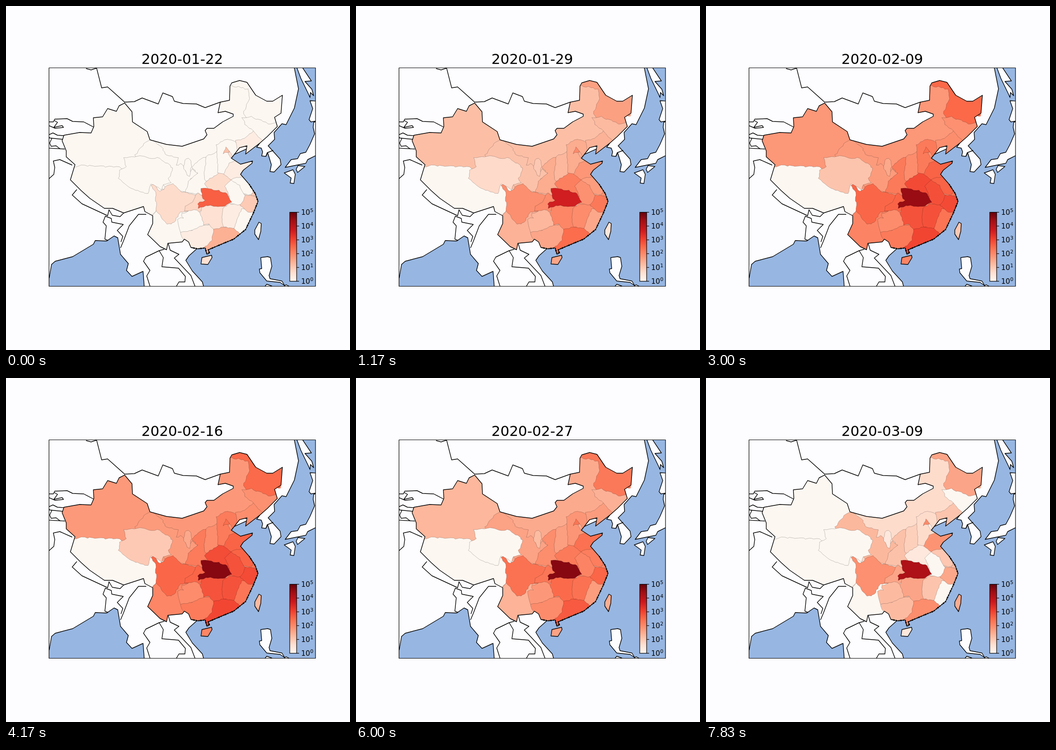
An HTML page that plays this animation: 748 px wide and 748 px high, repeating every 8000 ms.

```html
<!DOCTYPE html>
<html lang="en">
<head>
<meta charset="utf-8">
<title>Daily map</title>
<style>
html, body { margin: 0; width: 100%; height: 100%; overflow: hidden; background: #fdfdff; }
svg { display: block; width: 100%; height: 100%; }
text { font-family: "DejaVu Sans", sans-serif; fill: #000; }
.line { fill: none; stroke: #000; stroke-width: 1.4; stroke-linejoin: round; }
.sea { fill: #97b6e1; }
.land { fill: #fdfdff; }
.area { stroke: #000; stroke-opacity: .45; stroke-width: .5; }
.islets { stroke-width: 3; stroke-dasharray: 1.5 3 3 2 1 5; }
.thin { stroke-width: 1.2; }
</style>
</head>
<body>
<svg viewBox="0 0 748 748">
  <defs>
    <clipPath id="frame"><rect x="93.5" y="134.5" width="579.5" height="475"/></clipPath>
    <clipPath id="country"><path id="mask"/></clipPath>
    <linearGradient id="ramp" x1="0" y1="1" x2="0" y2="0"></linearGradient>
  </defs>
  <g clip-path="url(#frame)">
    <g id="base"></g>
    <g id="areas" clip-path="url(#country)"></g>
    <g id="edges"></g>
  </g>
  <rect class="line thin" x="93.5" y="134.5" width="579.5" height="475"/>
  <text id="title" x="383.3" y="125.6" font-size="30.56" text-anchor="middle"></text>
  <g id="bar"><rect class="thin" x="617" y="448.5" width="15" height="150" fill="url(#ramp)" stroke="#000"/></g>
</svg>
<script>
const $ = id => document.getElementById(id);
const LOOP = 8000, DAY_MS = 1000 / 6, LAST_DAY = 47, PEAK_DAY = 20;
const REDS = ['fdf7f1', 'fee0d2', 'fcbba1', 'fc9272', 'fb6a4a', 'ef3b2c', 'cb181d', 'a50f15', '67000d'];

function add(parent, tag, attrs, text) {
  const node = document.createElementNS('http://www.w3.org/2000/svg', tag);
  for (const key in attrs) node.setAttribute(key, attrs[key]);
  if (text) node.textContent = text;
  return parent.appendChild(node);
}
const open = pts => 'M' + pts;
const closed = pts => open(pts) + 'z';
const draw = (group, kind, d) => add($(group), 'path', { d, class: 'line ' + kind });
const sea = pts => draw('base', 'sea', closed(pts));
const land = pts => draw('base', 'land', closed(pts));
const border = pts => draw('base', '', open(pts));

// Seas, islands and neighbours
sea('85,595 94,591 99,562 107,555 145,545 190,518 194,510 219,511 235,500 243,504 249,540 266,560 262,575 274,588 298,577 301,615 85,615');
sea('431,615 427,600 405,576 391,553 398,543 417,526 480,480 480,330 552,298 545,307 555,309 558,317 556,326 565,327 569,319 577,345 574,360 583,361 598,345 596,333 570,304 584,290 583,275 600,256 609,258 627,222 636,180 626,130 680,130 680,615');
land('631,130 641,157 657,190 661,199 662,188 669,195 665,181 650,164 664,163 642,130');
land('680,207 661,206 667,223 659,247 663,252 680,249 669,253 668,264 671,278 661,301 652,318 640,321 634,332 620,334 607,351 652,342 656,334 680,322');
land('631,355 635,347 650,349 634,362');
land('605,363 624,356 629,366 626,386 618,385 620,374');
land('554,547 569,545 575,547 578,566 572,586 574,593 600,598 606,608 596,601 567,598 552,580 551,572 556,571');
land('561,612 567,605 578,609');
land('598,615 609,606 626,615');

border('174,136 185,139 197,135 208,178 221,176 258,209 279,208 296,200 331,213 341,189 362,197 366,207 385,212 414,213 433,221 466,209');
border('93,252 103,252 106,246 133,245 145,251 169,252 190,263');
border('93,260 107,266 125,264 122,260 104,264 112,253 105,249');
border('93,280 102,276 112,281 126,282');
border('93,284 95,287 124,290');
border('100,287 95,298 98,305 109,304 118,311');
border('90,309 128,311');
border('93,376 104,366 106,351 103,337 117,334 144,346');
border('154,399 144,411 165,430 221,456 224,443 231,455 248,458 256,450');
border('222,510 215,507 218,478 211,470 216,457 229,462 230,470 255,475 242,488 254,501 250,513');
border('305,453 288,453 268,478 255,512 249,526');
border('314,612 306,587 313,575 299,555 304,546 333,532 344,529');
border('333,532 342,547 339,567 375,570 390,588 389,600 376,600 369,612');
border('353,517 357,531 376,540 366,548 402,586 412,612');
border('565,327 568,319 581,314');

// Country outline, clockwise in stretches
const north = '126,281 160,275 185,276 191,262 190,243 210,241 221,223 240,229 246,217 258,211 274,230 275,252 307,273 313,291 349,301 383,305 430,289 437,280 433,271 437,266 452,266 471,252 494,240 494,235 477,229 461,232 466,209 486,205 487,174 491,167 508,162 524,166 543,194 567,207 580,207 601,194 598,233 584,242 590,262';
const gulf = '568,284 552,298 521,322 524,304 508,308 490,331 510,344 536,337 535,342 516,357 510,366';
const shore = '529,388 542,408 548,425 538,450 521,486 495,507 473,516 440,530 442,537 437,540 433,526 417,528 402,525';
const west = '397,513 388,507 383,513 352,516 349,530 335,523 308,497 319,473 319,456 302,447 299,436 256,450 232,440 214,440 182,418 163,401 140,378 150,345 131,328 131,315 122,293';
const islands = closed('426,547 447,542 448,547 439,562 424,561') + closed('550,470 555,473 554,490 549,508 541,496 541,487');
const nub = closed('590,230 598,230 597,240 591,240');
const outline = closed([north, gulf, shore, west].join(' ')) + islands;
$('mask').setAttribute('d', outline + nub);
draw('edges', '', outline);
draw('edges', 'islets', open(shore));

// Deterministic noise in -0.5..0.5
function noise(x, y) {
  const n = Math.sin(x * 12.9 + y * 78.2) * 43758.5;
  return n - Math.floor(n) - .5;
}

// Winding boundary: a slightly shifted point about every 6 px
function winding(pts) {
  const p = pts.split(' ').map(s => s.split(',').map(Number)), out = [];
  p.forEach(([x, y], i) => {
    const [u, v] = p[(i + 1) % p.length];
    const steps = Math.ceil(Math.hypot(u - x, v - y) / 6);
    for (let k = 0; k < steps; k++) {
      const a = x + (u - x) * k / steps, b = y + (v - y) * k / steps;
      out.push((a + 3 * noise(a, b)).toFixed(1) + ',' + (b + 3 * noise(b, a)).toFixed(1));
    }
  });
  return closed(out.join(' '));
}

// Levels are log10 of the count; later areas cover hidden sides of earlier ones
const regions = [];
function area(start, peak, end, pts, peakDay = PEAK_DAY) {
  const node = add($('areas'), 'path', { d: winding(pts), class: 'area' });
  regions.push({ node, start, peak, end, peakDay });
}
area(0, 1.8, .7, '90,130 640,130 640,580 90,580');
area(0, 1.8, 0, '80,180 320,180 316,291 330,350 280,390 80,390');
area(0, 0, 0, '80,353 148,351 165,347 246,350 345,400 326,448 305,462 80,470');
area(0, 1.75, 1.3, '281,325 300,299 316,291 324,294 341,309 345,321 375,331 371,346 383,343 398,368 405,355 416,362 416,372 402,376 390,406 350,395 290,340');
area(0, 1.55, .4, '386,348 389,335 397,330 403,338 402,361 398,372 389,358');
area(0, 1.1, -5, '257,330 292,325 317,332 330,329 357,346 363,357 354,374 358,385 343,389 339,399 315,388 308,408 272,397 245,376 248,357 261,350');
area(0, 2.1, -.6, '285,470 316,460 327,446 400,445 400,500 380,545 290,545');
area(0, 2.25, 1.15, '434,328 418,336 404,350 416,364 397,380 390,405 440,412 450,375 445,340');
area(.7, 2.55, 1.9, '314,389 323,388 334,403 345,400 348,391 362,386 383,404 416,411 410,445 378,449 369,466 359,474 349,473 327,446 325,405');
area(.8, 2.58, 1.6, '416,407 440,419 430,440 417,449 388,446 389,436 404,427');
area(0, 1.98, 1.25, '372,463 385,460 381,452 409,442 440,460 440,475 388,494 379,491');
area(.3, 2.25, 1.25, '378,491 400,489 430,476 460,474 465,510 445,545 395,545 385,507');
area(.6, 2.82, 1.6, '427,430 485,435 485,490 455,492 443,475 430,476 423,450');
area(1.41, 3, 1.95, '452,486 473,480 500,478 530,510 440,555 425,540 433,524 448,508');
area(.3, 2.84, 1.1, '472,440 484,430 515,428 520,445 497,484 473,480 470,470');
area(0, 2.35, 0, '540,440 513,442 503,460 497,484 518,505 555,480');
area(1, 2.93, 1.55, '505,408 541,414 560,418 560,450 526,448 509,433');
area(0, 2.6, 1.05, '490,366 500,372 515,355 570,390 531,411 505,405 485,380');
area(.95, 2.38, 1.25, '538,401 552,405 546,414 532,411');
area(0, 2.86, 0, '475,380 489,378 508,391 521,412 510,433 475,425 470,395');
area(.7, 2.93, .4, '450,362 473,360 490,378 476,391 486,415 445,410 432,387');
area(2.65, 4.7, 4.23, '425,397 435,397 462,402 482,408 490,426 472,437 440,433 419,439 417,430 432,422 426,413', 30);
area(0, 1.98, .9, '436,327 462,315 475,330 462,364 434,381 431,366');
area(0, 2.25, .7, '458,303 466,294 481,291 490,290 515,305 490,360 475,367 461,362 459,330');
area(.3, 2.6, 1.85, '485,342 520,325 550,325 550,360 490,377 474,367');
area(.6, 1.9, .3, '486,315 492,326 489,332 483,322');
area(1.15, 2.45, 2, '473,315 479,306 487,317 472,321');
area(0, 2.52, 1.6, '486,173 505,176 526,181 529,200 516,234 540,265 600,270 615,185 530,150 480,155');
area(0, 1.92, 0, '514,243 533,241 570,256 605,254 600,295 535,300 537,271 522,261');
area(.3, 1.95, 1.1, '499,293 519,288 537,271 556,292 570,320 505,335');
area(.6, 2.08, .4, '415,541 455,541 455,570 415,570');
area(0, 1.5, 1.5, '535,465 560,465 560,512 535,512', LAST_DAY);

// Colour bar
REDS.forEach((c, i) => add($('ramp'), 'stop', { offset: i / 8, 'stop-color': '#' + c }));
for (let i = 0; i < 6; i++) {
  const y = 598.5 - 30 * i;
  draw('bar', 'thin', `M632,${y}h5.3`);
  add($('bar'), 'text', { x: 641.8, y: y + 5.8, 'font-size': 15.28 }, '10');
  add($('bar'), 'text', { x: 661.6, y: y - .1, 'font-size': 10.7 }, String(i));
}

const channels = hex => [0, 2, 4].map(i => parseInt(hex.slice(i, i + 2), 16));
function color(level) {
  const x = level * 1.6, i = Math.min(7, Math.floor(x));
  const a = channels(REDS[i]), b = channels(REDS[i + 1]);
  return `rgb(${a.map((v, k) => Math.round(v + (b[k] - v) * (x - i)))})`;
}

// Fast rise that levels off at the peak, then a fall that gathers speed
function levelAt({ start, peak, end, peakDay }, day) {
  if (day <= peakDay) return peak - (peak - start) * (1 - day / peakDay) ** 2.5;
  const fall = ((day - peakDay) / (LAST_DAY - peakDay)) ** 2.5;
  return Math.max(0, peak - (peak - end) * fall);
}

let shown = -1;
function render(ms) {
  const day = Math.min(LAST_DAY, Math.floor((ms % LOOP + 3.4) / DAY_MS));
  if (day === shown) return;
  shown = day;
  $('title').textContent = new Date(Date.UTC(2020, 0, 22 + day)).toISOString().slice(0, 10);
  regions.forEach(r => r.node.setAttribute('fill', color(levelAt(r, day))));
}

function tick() {
  render(performance.now());
  requestAnimationFrame(tick);
}
render(0);
requestAnimationFrame(tick);
</script>
</body>
</html>
```
